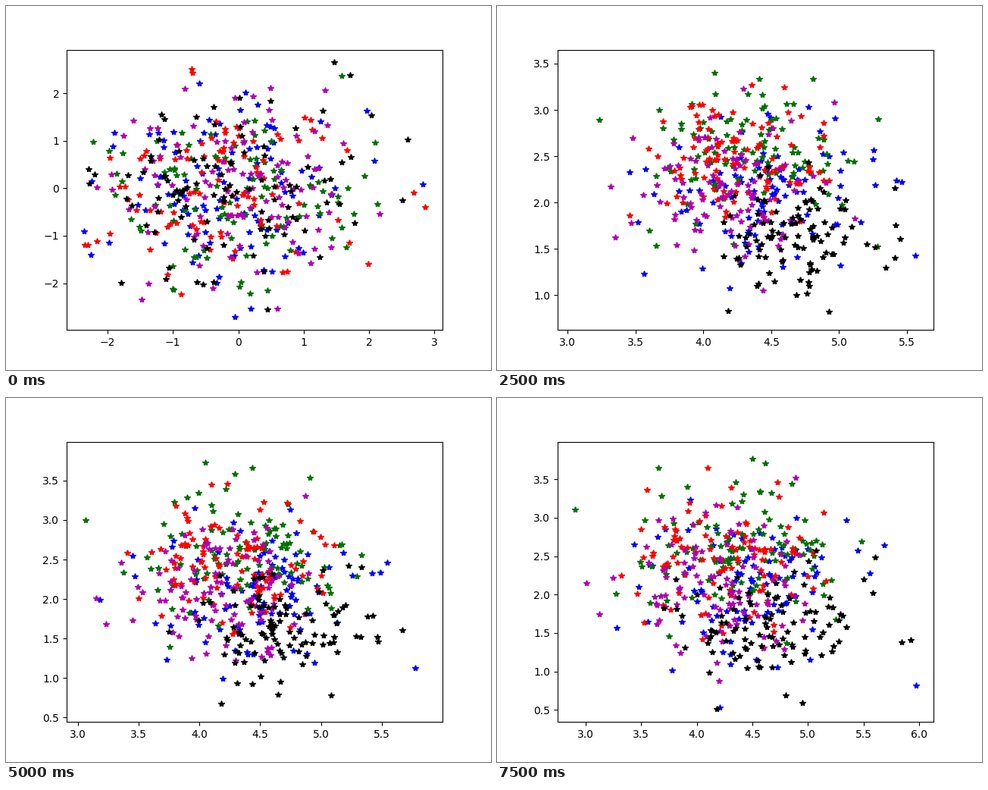
Animation, 640 px wide and 480 px high, one loop 8 s. Source, as a matplotlib script:

```python
import numpy as np
import matplotlib.pyplot as plt
from matplotlib.animation import FuncAnimation

FRAMES, INTERVAL = 16, 500
COUNT = 100
STEP = 0.08
COLORS = {"b": "blue", "g": "#007100", "r": "red", "m": "#b000b0", "k": "black"}
rng = np.random.default_rng(11)

# View at the opening, then at key steps: left, right, bottom, top
OPENING_VIEW = (-2.625, 3.123, -2.985, 2.917)
VIEW_KEYS = {
    1: (3.17, 5.62, 0.80, 3.565),
    3: (3.142, 5.657, 0.777, 3.46),
    5: (2.927, 5.695, 0.626, 3.65),
    8: (2.753, 5.974, 0.45, 4.043),
    11: (2.988, 6.012, 0.441, 3.966),
    13: (2.705, 6.027, 0.312, 3.938),
    15: (2.748, 6.13, 0.345, 3.987),
}

# Cluster centre and spread
CLUSTERS = {
    "b": ((4.48, 2.13), (0.36, 0.36)),
    "g": ((4.26, 2.60), (0.36, 0.34)),
    "r": ((4.26, 2.45), (0.30, 0.32)),
    "m": ((4.18, 2.17), (0.32, 0.34)),
    "k": ((4.67, 1.66), (0.28, 0.31)),
}

# Outermost points: fixed at the opening, drifting start to end afterwards
FAR = {
    "b": [(-0.05, -2.71), (-2.36, -0.91)],
    "r": [(2.86, -0.40)],
    "k": [(1.47, 2.65)],
}
DRIFT = {
    "b": [((5.50, 1.55), (5.97, 0.82))],
    "g": [((3.30, 2.85), (2.90, 3.11)), ((4.00, 3.33), (4.50, 3.77))],
    "r": [((4.41, 3.19), (4.10, 3.65))],
    "m": [((3.40, 1.60), (3.12, 1.75))],
    "k": [((4.18, 0.90), (4.18, 0.51))],
}


def make_views():
    keys = np.array(list(VIEW_KEYS.values()))
    steps = np.arange(FRAMES)
    views = np.column_stack([np.interp(steps, list(VIEW_KEYS), side)
                             for side in keys.T])
    views[0] = OPENING_VIEW
    return views


def fold(points, views):
    """Reflect stray points back inside the 5 % margins."""
    lo, hi = views[:, None, 0::2], views[:, None, 1::2]
    pad = (hi - lo) / 22
    points = lo + pad + np.abs(points - lo - pad)
    return hi - pad - np.abs(hi - pad - points)


def make_track(name):
    """Positions by step, shape (FRAMES, COUNT, 2)."""
    centre, spread = CLUSTERS[name]
    moves = rng.normal(0, STEP, (FRAMES, COUNT, 2))
    moves[:2] = 0
    track = centre + rng.standard_normal((COUNT, 2)) * spread + moves.cumsum(axis=0)

    t = np.clip((np.arange(FRAMES) - 3) / (FRAMES - 4), 0, 1)[:, None]
    for i, (start, end) in enumerate(DRIFT[name]):
        track[:, i] = start + t * np.subtract(end, start)

    track[0] = rng.standard_normal((COUNT, 2))
    for i, point in enumerate(FAR.get(name, [])):
        track[0, i] = point
    return fold(track, views)


views = make_views()
tracks = {name: make_track(name) for name in CLUSTERS}

fig, ax = plt.subplots(figsize=(6.4, 4.8), dpi=100)
stars = {name: ax.plot([], [], "*", color=color)[0]
         for name, color in COLORS.items()}


def update(i):
    for name, line in stars.items():
        line.set_data(*tracks[name][i].T)
    ax.set_xlim(*views[i, :2])
    ax.set_ylim(*views[i, 2:])
    return list(stars.values())


anim = FuncAnimation(fig, update, frames=FRAMES, interval=INTERVAL,
                     repeat=True, repeat_delay=0, blit=False)
plt.show()
```
